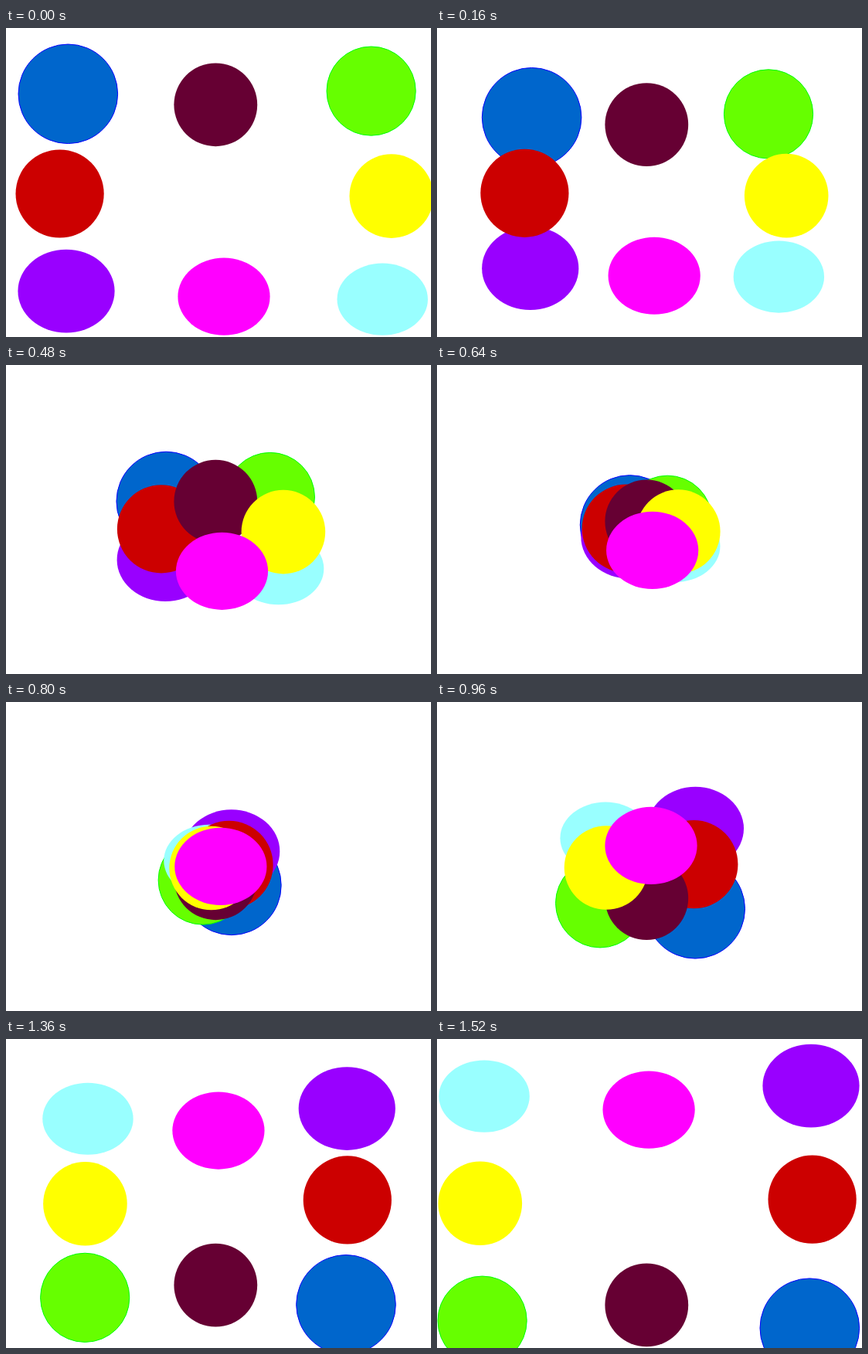
These frames come from a looping animation (550 px wide and 400 px high, 1.6 s). An HTML page with a canvas:

```html
<!DOCTYPE html>
<html lang="en">
<head>
<meta charset="utf-8">
<title>Crossing circles</title>
<style>
  html, body { margin: 0; width: 100%; height: 100%; overflow: hidden; background: #fff; }
  canvas { display: block; }
</style>
</head>
<body>
<canvas id="stage" width="550" height="400"></canvas>
<script>
const ctx = document.getElementById("stage").getContext("2d");
const STEP_MS = 80;
const STEPS = 20;

// Back to front; each disc travels in a straight line at constant speed.
const discs = [
  { from: [80.3, 85.3], to: [482.3, 374.2], size: [64.3, 64.3], fill: "#0066cc", line: "#0000ff" },
  { from: [472.6, 81.6], to: [58.6, 364.6], size: [57.6, 57.6], fill: "#66ff00", line: "#00ff00" },
  { from: [78, 340.6], to: [484, 60.6], size: [62.6, 53.9], fill: "#9900ff" },
  { from: [487.2, 351.2], to: [61.1, 74.1], size: [58.7, 46.6], fill: "#99ffff" },
  { from: [69.6, 214.5], to: [485.6, 207.7], size: [57.1, 57.1], fill: "#cc0000" },
  { from: [271.3, 99.3], to: [271.3, 344.4], size: [53.9, 53.9], fill: "#660033" },
  { from: [498.8, 217.6], to: [55.8, 212.8], size: [54.3, 54.3], fill: "#ffff00" },
  { from: [282, 347.7], to: [274.1, 91.6], size: [59.6, 50.1], fill: "#ff00ff" }
];

const mix = (a, b, t) => a + (b - a) * t;

function drawDisc({ from, to, size, fill, line }, t) {
  ctx.beginPath();
  ctx.ellipse(mix(from[0], to[0], t), mix(from[1], to[1], t), size[0], size[1], 0, 0, Math.PI * 2);
  ctx.fillStyle = fill;
  ctx.fill();
  if (line) {
    ctx.strokeStyle = line;
    ctx.lineWidth = 1;
    ctx.stroke();
  }
}

function render(now) {
  const step = Math.floor(now / STEP_MS) % STEPS;
  ctx.fillStyle = "#fff";
  ctx.fillRect(0, 0, 550, 400);
  discs.forEach(disc => drawDisc(disc, step / (STEPS - 1)));
}

let start;
function tick(now) {
  start ??= now;
  render(now - start);
  requestAnimationFrame(tick);
}

render(0);
requestAnimationFrame(tick);
</script>
</body>
</html>
```
